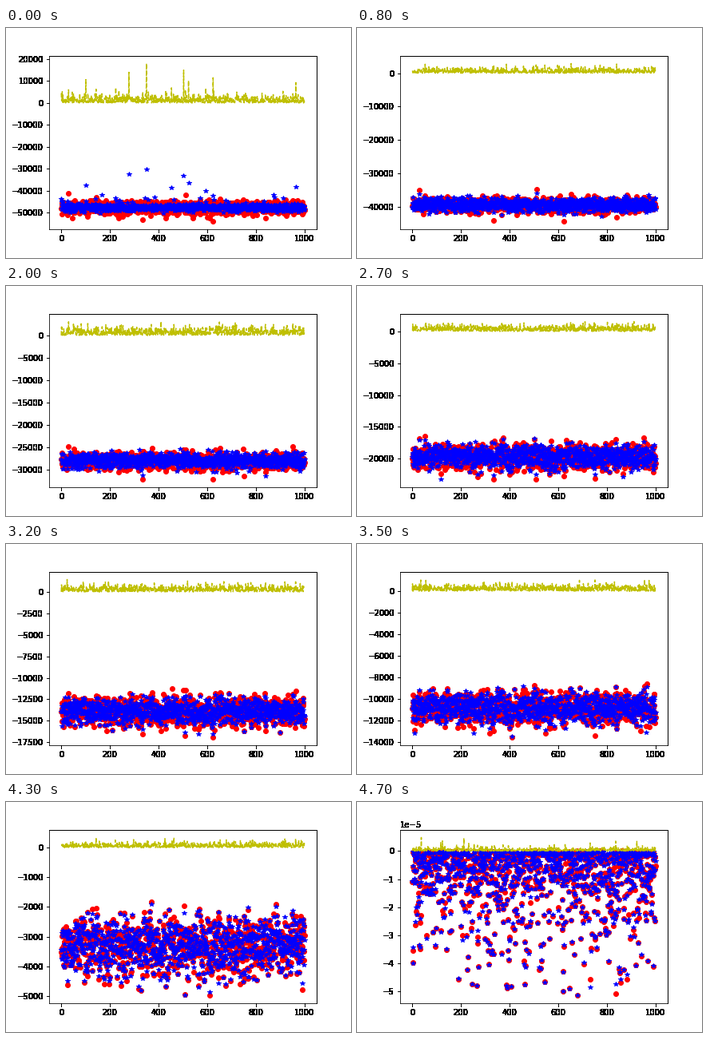
A matplotlib script for the animation above (4.8 s loop, 432 by 288 pixels).

```python
import numpy as np
import matplotlib.pyplot as plt
from matplotlib.animation import FuncAnimation

FRAMES, PATHS = 48, 1000
LAST = FRAMES - 1
SCALE = 54                                    # variance / mean of the costs
SPIKES = {350: 18000, 503: 15000, 278: 14000}  # worst fits at the start

rng = np.random.default_rng(7)
steps = np.arange(FRAMES)

# Mean value and typical fit error along the time steps
mean = np.interp(steps, [0, 8, 20, 27, 32, 39, LAST],
                 [-47600, -39500, -27900, -19700, -13900, -6700, 0])
error = np.interp(steps, [1, 8, 20, 27, 32, 39, 46],
                  [800, 776, 821, 417, 382, 159, 40])

# The value of a path is minus the sum of its remaining costs
drift = np.diff(mean)[:, None]
costs = rng.gamma(drift / SCALE, SCALE, (LAST, PATHS))
costs[:, 30] = 0.865 * drift[:, 0]
values = -np.cumsum(costs[::-1], axis=0)[::-1]


def stretch(a, peak):
    return a * peak / np.abs(a).max()


def first_step():
    """Poor fit with a heavy upper tail."""
    value = values[0]
    tail = rng.exponential(2500, PATHS) * (rng.random(PATHS) < 0.08)
    fit = mean[0] + 800 * rng.standard_normal(PATHS) + tail
    for path, gap in SPIKES.items():
        fit[path] = value[path] + gap
    return value, fit


def middle_step(i):
    var = -SCALE * mean[i]
    lowest = np.sqrt(var) * (3.2 + 5 * np.sqrt(-SCALE / mean[i]))
    dev = values[i] - mean[i]
    dev *= lowest / -dev.min()
    # Regression fit: shrunk towards the mean, plus its own noise
    rho = 1 - error[i] ** 2 / var
    noise = np.sqrt(rho * (1 - rho) * var) * rng.standard_normal(PATHS)
    miss = stretch((rho - 1) * dev + noise, 3.8 * error[i])
    fit = np.maximum(dev + miss, -lowest)
    return mean[i] + dev, mean[i] + fit


def last_step():
    draws = rng.gamma(0.7, 1.4, 2 * PATHS)
    value = -stretch(draws[draws < 5.1][:PATHS], 5.15e-5)
    miss = stretch(rng.standard_t(4, PATHS), 0.6e-5)
    return value, np.maximum(-np.abs(value + miss), value.min())


def harden(image, dpi):
    """Turn every touched pixel solid black."""
    solid = np.zeros_like(image)
    solid[..., 3] = image[..., 3] > 0
    return solid, 0, 0


pairs = [first_step(), *map(middle_step, range(1, LAST)), last_step()]
frames = [(value, fit, np.abs(value - fit)) for value, fit in pairs]

plt.rcParams.update({"figure.subplot.bottom": 0.125, "font.size": 10})
fig, ax = plt.subplots(figsize=(6, 4), dpi=72)
lines = [ax.plot(np.zeros(PATHS), style)[0] for style in ("ro", "b*", "y--")]
for part in (ax.xaxis, ax.yaxis, ax.spines["top"], ax.spines["right"]):
    part.set_agg_filter(harden)


def draw(i):
    for line, y in zip(lines, frames[i]):
        line.set_ydata(y)
    low, high = np.min(frames[i]), np.max(frames[i])
    pad = 0.05 * (high - low)
    ax.set_ylim(low - pad, high + pad)
    return lines


anim = FuncAnimation(fig, draw, frames=FRAMES, interval=100, repeat=True)
plt.show()
```
